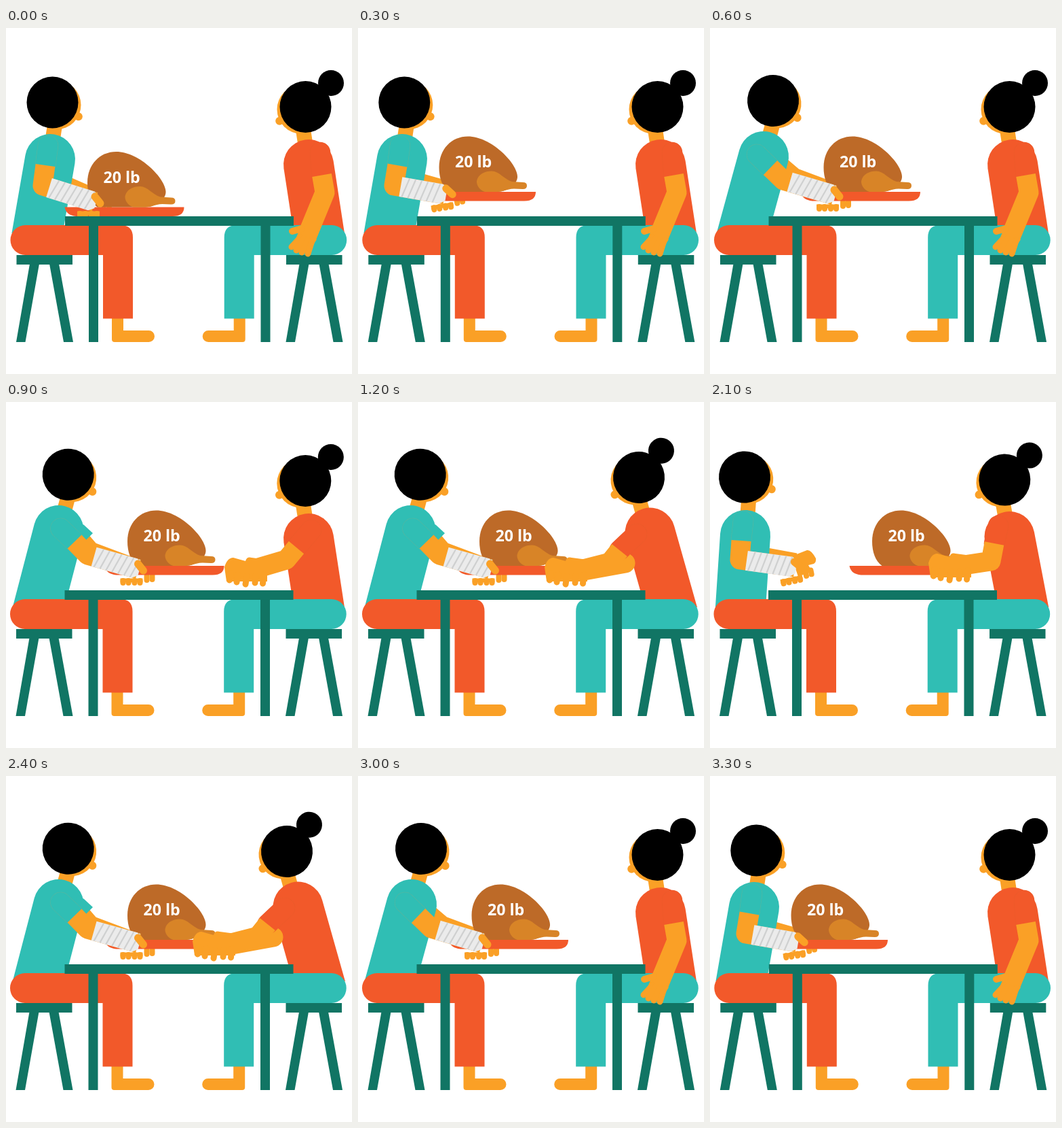
Animation, 510 px wide and 509 px high, one loop 3.6 s. Source, as an HTML page:

```html
<!DOCTYPE html>
<html lang="en">
<head>
<meta charset="utf-8">
<title>Passing the turkey</title>
<style>
  html, body { margin: 0; width: 100%; height: 100%; overflow: hidden; background: #fff; }
  svg { display: block; width: 100%; height: 100%; }
  text { font: 700 23.2px "Open Sans", "Noto Sans", sans-serif; fill: #fff; }
</style>
</head>
<body>
<svg id="stage" viewBox="0 0 510 509"></svg>
<script>
const TEAL = '#30beb4', SKIN = '#faa026', RED = '#f2592a', GREEN = '#117564';
const STEP = 300;

// head: x, y, tilt; arm: cuff, elbow, wrist; far: the arm behind the body
const men = {
  rest:  { head: [68.5, 109.5, 0], chest: [65, 193], hip: 46, sleeve: [62, 173],
           arm: [[58, 202], [54, 232], [131, 256]], hand: [131, 256, 0], far: [[88, 225], [125, 241]] },
  lift:  { head: [68.3, 109.5, 0], chest: [65, 193], hip: 46, sleeve: [62, 173],
           arm: [[58, 202], [53, 232], [128, 245]], hand: [131, 244, -9], far: [[88, 220], [127, 231]] },
  reach: { head: [93, 107, 6.6], chest: [79, 189], hip: 48, sleeve: [69, 186],
           arm: [[89, 205.5], [108, 224], [183, 246]], hand: [183, 246, 0],
           far: [[107, 197], [127, 214], [178, 233]] },
  give:  { head: [91.7, 106.7, 6.6], chest: [77.5, 189], hip: 48, sleeve: [80.5, 186],
           arm: [[101, 205.5], [120, 225], [195, 246]], hand: [194.5, 246, 0],
           far: [[116, 200], [128, 214], [184, 235]], cuff: 'M105 175L115 181L128 193L118 203L100 195Z' },
  back:  { head: [51, 110.5, -4.5], chest: [52, 196], hip: 45, sleeve: [49, 175],
           arm: [[46, 204], [44, 232], [125, 243]], hand: [126, 243, -12], far: [[78, 221], [127, 230]],
           palm: 'M120 227L143 218Q149 217 156 230Q157 235 153 238L145 240L150 249L130 257Z' }
};
const women = {
  rest: { head: [441.5, 116, 0], chest: [446, 201], sleeve: [463, 183],
          arm: [[465.5, 216.5], [470, 242], [444, 305]] },
  wait: { head: [441.3, 116, 0], chest: [446, 201], sleeve: [450, 188],
          arm: [[428, 214], [413, 232], [362, 247]], hand: [47, 0] },
  take: { head: [414, 111, -7], chest: [430.5, 192.5], sleeve: [411, 194],
          arm: [[385.5, 218], [371, 236], [320, 249]], far: [[394, 237], [328, 249]], hand: [0, 0] },
  hold: { head: [434.3, 114.5, -1.5], chest: [441.5, 198], sleeve: [425, 182],
          arm: [[419, 208], [414, 234], [368, 241]], hand: [47, -6] },
  set:  { head: [434.3, 114.5, -1.5], chest: [441.5, 198], sleeve: [425, 182],
          arm: [[419, 208], [414, 240], [368, 260]], hand: [47, 16] }
};
// man, woman, turkey offset, drift of the whole set
const poses = [
  ['rest', 'rest', 0.5, 22.5, 0],
  ['lift', 'rest', 0, 0, -0.2],
  ['reach', 'rest', 48, 0, -0.5],
  ['give', 'wait', 59.5, 0, -0.5],
  ['give', 'take', 59.5, 0, -0.5],
  ['back', 'hold', 119.5, 0, -1],
  ['back', 'set', 119.5, 22.5, -1]
];

const path = (d, fill) => `<path d="${d}" fill="${fill}"/>`;
const rect = (x, y, w, h, fill) => `<rect x="${x}" y="${y}" width="${w}" height="${h}" fill="${fill}"/>`;
const disc = (x, y, r, fill) => `<circle cx="${x}" cy="${y}" r="${r}" fill="${fill}"/>`;
const group = (transform, body) => `<g transform="${transform}">${body}</g>`;
const line = (points, width, color, cap = 'butt') =>
  `<polyline points="${points.join(' ')}" fill="none" stroke="${color}" stroke-width="${width}" stroke-linecap="${cap}" stroke-linejoin="round"/>`;
const finger = (x1, y1, x2, y2, w = 9) => line([[x1, y1], [x2, y2]], w, SKIN, 'round');

function torso([x, y], hip, color) {
  const base = 302, r = 37, len = Math.hypot(hip - x, base - y);
  const nx = (base - y) / len * r, ny = (x - hip) / len * r, half = r * len / (base - y);
  return path(`M${hip - half} ${base}L${x - nx} ${y - ny}A${r} ${r} 0 0 1 ${x + nx} ${y + ny}L${hip + half} ${base}Z`, color);
}

const head = ([x, y, tilt], flip, bun = '') => group(`translate(${x} ${y}) rotate(${tilt}) scale(${flip} 1)`,
  line([[4, 30], [0.5, 53]], 22, SKIN) + disc(6, 3.7, 36, SKIN) + disc(38.3, 20.8, 6, SKIN) +
  disc(0, 0, 38, '#000') + bun);

const sleeve = (from, cuff, color, seam) =>
  line([from, cuff], 30.4, seam, 'round') + line([from, cuff], 29.4, color, 'round');

function bandage([ex, ey], [wx, wy]) {
  const len = Math.hypot(wx - ex, wy - ey), angle = Math.atan2(wy - ey, wx - ex) * 180 / Math.PI;
  let wrap = path(`M10 -14.6H${len - 5}L${len + 2} -9V9L${len - 6} 14.6H10Z`, '#ebebeb');
  for (let x = 18; x < len - 4; x += 9.2)
    wrap += line([[x + 3, -14.4], [x - 4, 14.4]], 2.2, '#cfd0d0');
  return group(`translate(${ex} ${ey}) rotate(${angle})`, wrap);
}

const manHand = ([x, y, tilt], body) => group(`translate(${x} ${y}) rotate(${tilt})`, body);
const manFarHand = finger(13, 10, 13, 16, 8) + finger(21, 9, 21, 15, 8);
const manNearHand = rect(-26, 13.5, 33, 6, SKIN) +
  [-22, -14, -5, 3].map(x => finger(x, 17, x, 20, 8)).join('');

const womanHand = path('M278 264L275 243Q279 229 288 229L306 234Q308 227 315 229L338 232V264Z', SKIN) +
  finger(284, 252, 282.5, 262) + finger(295, 254, 293, 265) + finger(308, 256, 306, 268) +
  finger(321, 256, 320, 266) + finger(333, 254, 331.5, 267);
const restingHand = path('M434 293L424 318L445 332L458 311Z', SKIN) + finger(436, 295, 422, 299, 10) +
  finger(434, 308, 421, 322) + finger(439, 310, 428, 327) + finger(445, 312, 436, 330) + finger(451, 313, 445, 332);

const thigh = color => path('M28.5 290H169Q187 290 187 308V427.5H143V334H28.5A22 22 0 0 1 28.5 290Z', color);
const foot = path('M156 427H173V445H210.5A8.5 8.5 0 0 1 210.5 462H160Q156 462 156 458Z', SKIN);
const legs = color => foot + thigh(color);
const stool = rect(15.5, 334, 82.5, 14, GREEN) +
  path('M35 347H49L28.5 462H15ZM64 347H78L99 462H85Z', GREEN);
const table = rect(87, 277, 337, 14, GREEN) + rect(122, 290, 14, 172, GREEN) + rect(375.5, 290, 14, 172, GREEN);
const mirrored = body => group('translate(508.7 0) scale(-1 1)', body);

const turkey = path('M86 241H262Q262 254.5 245 254.5H103Q88 253 86 241Z', RED) +
  path('M134 241C124 234 119.5 220 119.5 205C119.5 178 138 159.5 162 159.5C196 159.5 235 199 235 219C235 230 220 241 205 241Z', '#bd6a28') +
  path('M187 241C178 238 174.5 230 175 225C177 215 187 210.5 197 210.5C208 210.5 216 223 227 226L243 227Q249 227 249 232Q249 237 243 237L230 236.5C218 237 214 241 205 241Z', '#d88427') +
  '<text x="143" y="205">20 lb</text>';

function scene([manName, womanName, tx, ty, drift]) {
  const man = men[manName], woman = women[womanName];
  const [cuff, elbow, wrist] = man.arm;
  const set = body => group(`translate(${drift} 0)`, body);
  const bun = disc(-37.5, -35, 19, '#000');
  return set(stool + group('translate(397.5 0)', stool)) +
    line(man.far, 15, SKIN) + head(man.head, 1) + torso(man.chest, man.hip, TEAL) +
    (man.cuff ? path(man.cuff, TEAL) : '') +
    head(woman.head, -1, bun) + torso(woman.chest, 461.5, RED) +
    set(legs(RED) + mirrored(legs(TEAL))) +
    manHand(man.hand, manFarHand) +
    group(`translate(${tx} ${ty})`, turkey) +
    (man.palm ? path(man.palm, SKIN) : '') +
    manHand(man.hand, manNearHand) +
    sleeve(man.sleeve, cuff, TEAL, '#5fb49b') + line(man.arm, 29, SKIN) + bandage(elbow, wrist) +
    manHand(man.hand, finger(0, -8, 8, 2, 11)) +
    (woman.far ? line(woman.far, 29, SKIN, 'round') : '') +
    sleeve(woman.sleeve, woman.arm[0], RED, '#ea5c2b') + line(woman.arm, 29, SKIN) +
    (woman.hand ? group(`translate(${woman.hand.join(' ')})`, womanHand) : restingHand) +
    set(table);
}

const stage = document.getElementById('stage');
const scenes = poses.map(scene);
const start = performance.now();
let shown = -1;

function play() {
  const step = Math.floor((performance.now() - start) / STEP) % 12;
  const pose = step > 6 ? 12 - step : step;
  if (pose !== shown) stage.innerHTML = scenes[shown = pose];
  requestAnimationFrame(play);
}
play();
</script>
</body>
</html>
```
